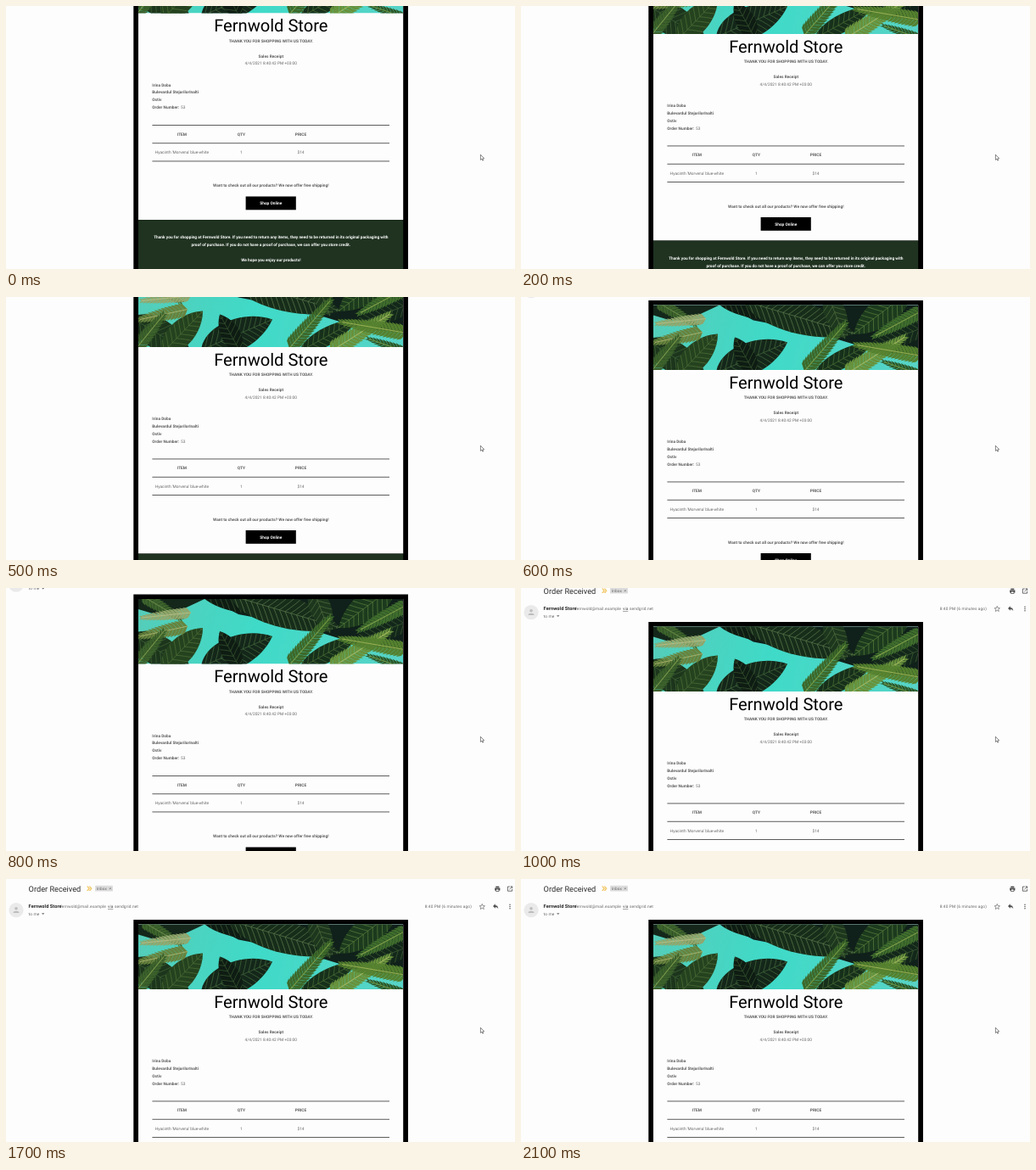
An HTML page with a canvas for the animation above (2200 ms loop, 600 px wide and 310 px high).

```html
<!DOCTYPE html>
<html lang="en">
<head>
<meta charset="utf-8">
<title>Order receipt</title>
<style>
html, body { margin: 0; width: 100%; height: 100%; overflow: hidden; background: #fefdfe; }
canvas { display: block; width: 600px; height: 310px; }
</style>
</head>
<body>
<canvas id="stage"></canvas>
<script>
const W = 600, H = 310, LOOP = 2200, STEP = 100;
const PAPER = '#fefdfe';
// Scroll position at each step: three wheel notches, then rest
const SCROLL = [-121.5, -116, -97, -86, -81, -71, -44, -41, -40.5, -29, -8, -1.5, 0];

const canvas = document.getElementById('stage');
const ctx = canvas.getContext('2d');
const dpr = window.devicePixelRatio || 1;
canvas.width = W * dpr;
canvas.height = H * dpr;

function rect(x, y, w, h, color) {
  ctx.fillStyle = color;
  ctx.fillRect(x, y, w, h);
}

function disc(x, y, r, color) {
  ctx.fillStyle = color;
  ctx.beginPath();
  ctx.arc(x, y, r, 0, Math.PI * 2);
  ctx.fill();
}

function poly(points, fill, stroke, width = 1, close = true) {
  ctx.beginPath();
  for (let i = 0; i < points.length; i += 2) ctx.lineTo(points[i], points[i + 1]);
  if (close) ctx.closePath();
  if (fill) { ctx.fillStyle = fill; ctx.fill(); }
  if (stroke) { ctx.strokeStyle = stroke; ctx.lineWidth = width; ctx.stroke(); }
}

// y is the middle of the capital letters
function text(str, x, y, o = {}) {
  const { size = 4.8, weight = 400, color = '#666', align = 'left', gap = 0 } = o;
  ctx.font = `${weight} ${size}px Roboto, Arial, sans-serif`;
  ctx.textRendering = 'geometricPrecision';
  ctx.letterSpacing = gap + 'px';
  ctx.textAlign = align;
  ctx.fillStyle = color;
  ctx.fillText(str, x, y + size * 0.355);
}

const bold = (str, x, y, o) => text(str, x, y, { weight: 700, color: '#5c5c5c', ...o });
const mid = (str, x, y, o) => text(str, x, y, { align: 'center', ...o });
const midBold = (str, x, y, o) => bold(str, x, y, { align: 'center', ...o });

// Broad leaf from stem to tip with side veins
function leaf(x1, y1, x2, y2, w, fill, vein) {
  const dx = x2 - x1, dy = y2 - y1, len = Math.hypot(dx, dy);
  ctx.save();
  ctx.translate(x1, y1);
  ctx.rotate(Math.atan2(dy, dx));
  ctx.beginPath();
  ctx.moveTo(0, 0);
  ctx.bezierCurveTo(len * 0.15, -w, len * 0.7, -w, len, 0);
  ctx.bezierCurveTo(len * 0.7, w, len * 0.15, w, 0, 0);
  ctx.fillStyle = fill;
  ctx.fill();
  ctx.clip();
  ctx.strokeStyle = vein;
  ctx.lineWidth = 0.7;
  ctx.beginPath();
  ctx.moveTo(0, 0);
  ctx.lineTo(len, 0);
  for (let x = len * 0.05; x < len; x += 7) {
    for (const side of [-1, 1]) {
      ctx.moveTo(x, 0);
      ctx.quadraticCurveTo(x + w * 0.3, side * w * 0.35, x + w * 0.7, side * w);
    }
  }
  ctx.stroke();
  ctx.restore();
}

// Frond: pointed leaflets on both sides of a stem
function fern(x1, y1, x2, y2, w, color, stem) {
  const dx = x2 - x1, dy = y2 - y1, len = Math.hypot(dx, dy);
  ctx.save();
  ctx.translate(x1, y1);
  ctx.rotate(Math.atan2(dy, dx));
  for (let x = 0; x < len; x += 4.2) {
    const reach = w * (1 - 0.75 * (x / len) ** 2);
    for (const side of [-1, 1]) {
      poly([x, 0, x + 4, 0, x + 6 + reach * 0.45, side * reach, x + 2 + reach * 0.3, side * reach * 0.8], color);
    }
  }
  poly([0, 0, len, 0], null, stem, 1, false);
  ctx.restore();
}

function banner() {
  ctx.save();
  ctx.translate(156, 53.5);
  ctx.beginPath();
  ctx.rect(0, 0, 312, 76.5);
  ctx.clip();
  const sea = ctx.createLinearGradient(0, 0, 312, 76);
  sea.addColorStop(0, '#55cdb9');
  sea.addColorStop(0.45, '#3fdac8');
  sea.addColorStop(1, '#58d3c6');
  rect(0, 0, 312, 76.5, sea);

  // Shadows and dark foliage
  poly([0, 0, 78, 0, 48, 14, 20, 18, 0, 12], '#14271a');
  poly([84, 0, 312, 0, 312, 60, 262, 54, 216, 40, 160, 26, 118, 18], '#10201a');
  leaf(-8, 42, 62, 84, 24, '#1c351c', '#3f6336');
  leaf(28, 84, 76, 34, 20, '#25421f', '#4d7038');
  leaf(74, 80, 158, 44, 25, '#14271a', '#41643a');
  leaf(120, 82, 96, 38, 15, '#0e1c13', '#35532e');
  leaf(70, -10, 165, 14, 18, '#0e1c13', '#3a5632');
  leaf(106, -5, 238, 34, 26, '#172d1a', '#57754a');
  leaf(205, -14, 226, 40, 17, '#1d371e', '#4c6c3c');
  leaf(302, -16, 236, 34, 22, '#1c3a1d', '#557b3d');
  leaf(330, 22, 250, 52, 16, '#13271a', '#3c5b33');
  leaf(190, 82, 258, 44, 14, '#16301b', '#486b34');

  // Lighter fronds
  fern(4, -4, 48, 22, 8, '#3d632c', '#668748');
  fern(62, 16, 4, 22, 7, '#91a66c', '#b2bc83');
  fern(58, 32, 2, 44, 9, '#67833e', '#a1ad68');
  fern(-4, 80, 30, 38, 9, '#3b602b', '#7f9c4d');
  fern(178, 78, 226, 22, 10, '#3d692a', '#7d9e46');
  fern(226, 82, 296, 38, 11, '#68923c', '#a2b55f');
  fern(316, 60, 240, 47, 10, '#55812f', '#98b054');
  fern(318, 6, 262, 36, 9, '#3f6d2d', '#85a44c');
  fern(318, 83, 272, 67, 6, '#2d5727', '#6f9341');
  ctx.restore();
}

function icons() {
  const ink = '#4b4b4b';
  // Importance marker
  for (const x of [95, 97.6]) {
    poly([x, 8.6, x + 1.8, 8.6, x + 4, 11.3, x + 1.8, 14, x, 14, x + 2, 11.3], '#f2cc72');
  }
  // Label chip
  ctx.fillStyle = '#dddcdd';
  ctx.beginPath();
  ctx.roundRect(105, 7.8, 21, 6.8, 1.2);
  ctx.fill();
  text('Inbox', 107, 11.3, { size: 4.7, gap: 0.1 });
  poly([121.7, 10.2, 123.9, 12.4], null, '#666', 0.6, false);
  poly([123.9, 10.2, 121.7, 12.4], null, '#666', 0.6, false);
  // Printer
  rect(577.3, 8.6, 4, 1.5, ink);
  rect(576.2, 10.5, 6.2, 3, ink);
  rect(577.3, 11.9, 4, 2.9, ink);
  rect(578, 12.4, 2.6, 1.7, PAPER);
  // Open in new window
  poly([593.8, 9, 591.4, 9, 591.4, 14.2, 596.6, 14.2, 596.6, 11.8], null, ink, 0.8, false);
  poly([594.6, 8.9, 596.7, 8.9, 596.7, 11], null, ink, 0.8, false);
  poly([593.4, 12.2, 596.6, 9], null, ink, 0.8, false);
  // Star
  const star = [];
  for (let i = 0; i < 10; i++) {
    const a = -Math.PI / 2 + i * Math.PI / 5, r = i % 2 ? 1.5 : 3.4;
    star.push(561.3 + r * Math.cos(a), 32.8 + r * Math.sin(a));
  }
  poly(star, null, '#606060', 0.65);
  // Reply
  poly([574, 32, 576.8, 29.3, 576.8, 31, 579.2, 31.7, 580.4, 35, 578.7, 33.4, 576.8, 33, 576.8, 34.7], '#505050');
  for (const y of [30.2, 32.5, 34.8]) disc(594, y, 0.75, '#505050');
}

function header() {
  text('Order Received', 26.6, 11.3, { size: 9.2, color: '#2c2c2c' });
  icons();
  disc(12, 36.7, 8.6, '#ebeaeb');
  disc(12, 34.8, 1.8, '#bdbdbd');
  ctx.beginPath();
  ctx.ellipse(12, 40, 3.5, 2.2, 0, Math.PI, 0);
  ctx.fill();
  bold('Fernwold Store', 26.6, 32.5, { size: 5.6, color: '#222', gap: 0.08 });
  const note = { gap: 0.12, color: '#666' };
  text('fernwold@mail.example', 64, 32.5, note);
  text('via', 120, 32.5, { ...note, color: '#444' });
  rect(120, 35, 6.3, 0.5, '#555');
  text('sendgrid.net', 128, 32.5, note);
  text('to me', 26.6, 41, note);
  poly([42, 40.2, 45.4, 40.2, 43.7, 42], '#666');
  text('8:40 PM (6 minutes ago)', 549, 32.5, { ...note, align: 'right' });
}

function receipt() {
  rect(150.3, 48, 323.7, 420, '#000');
  rect(156, 53.5, 312.2, 320, PAPER);
  banner();
  mid('Fernwold Store', 312.3, 144.8, { size: 20.1, color: '#000' });
  midBold('THANK YOU FOR SHOPPING WITH US TODAY.', 312.3, 162.5);
  midBold('Sales Receipt', 312.3, 180.5);
  mid('4/4/2021 8:40:42 PM +03:00', 312.3, 189.2);

  bold('Irina Doba', 172.3, 214.3);
  bold('Bulevardul StejarilorInalti', 172.3, 223.2);
  bold('Ostiv', 172.3, 232);
  bold('Order Number:', 172.3, 240.8);
  text('53', 206, 240.8);

  for (const y of [261.5, 282.8, 304]) rect(172.4, y, 279.6, 0.9, '#4a4a4a');
  const cols = [207.4, 277.4, 347.5];
  ['ITEM', 'QTY', 'PRICE'].forEach((s, i) => midBold(s, cols[i], 272.6));
  ["Hyacinth 'Morvena' blue-white", '1', '$14'].forEach((s, i) => mid(s, cols[i], 293.9));

  midBold('Want to check out all our products? We now offer free shipping!', 312.3, 333.2);
  rect(282.6, 346, 59.2, 15.8, '#000');
  midBold('Shop Online', 312.3, 353.9, { color: '#fff' });

  rect(156, 373.6, 312.2, 95, '#203321');
  [
    ['Thank you for shopping at Fernwold Store. If you need to return any items, they need to be returned in its original packaging with', 394.2],
    ['proof of purchase. If you do not have a proof of purchase, we can offer you store credit.', 403],
    ['We hope you enjoy our products!', 420.7]
  ].forEach(([s, y]) => midBold(s, 312.3, y, { color: '#fff' }));
}

function pointer() {
  poly([559.4, 175.2, 559.4, 181.4, 560.8, 180.2, 561.8, 182.2, 562.7, 181.8, 561.8, 179.8, 563.6, 179.5], '#fff', '#333', 0.6);
}

function draw() {
  const step = Math.floor((performance.now() % LOOP) / STEP);
  ctx.setTransform(dpr, 0, 0, dpr, 0, 0);
  rect(0, 0, W, H, PAPER);
  ctx.save();
  ctx.translate(0, SCROLL[Math.min(step, SCROLL.length - 1)]);
  header();
  receipt();
  ctx.restore();
  pointer();
  requestAnimationFrame(draw);
}
draw();
</script>
</body>
</html>
```
